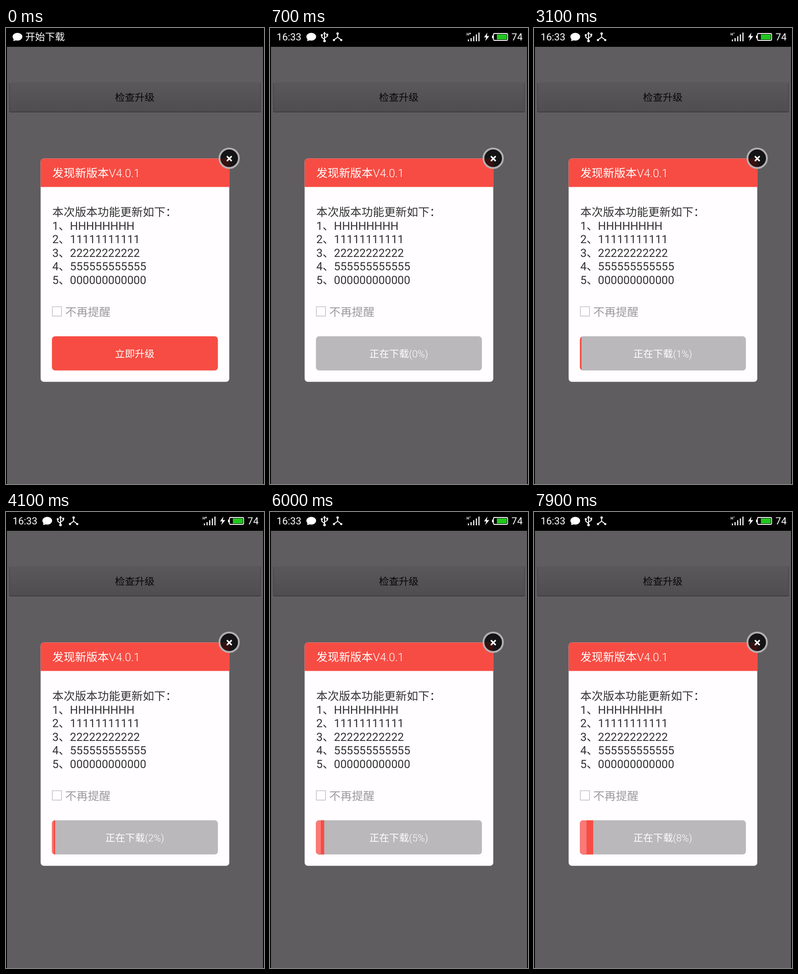
Write an HTML page that moves like this. It is 563 px wide and 994 px high and loops after 8 s.

```html
<!DOCTYPE html>
<html lang="zh-CN">
<head>
<meta charset="utf-8">
<title>升级对话框</title>
<style>
  html, body { margin: 0; width: 100%; height: 100%; overflow: hidden; background: #000; }
  svg { display: block; width: 100vw; height: 100vh; }
  text { font-family: Roboto, "Noto Sans CJK SC", "Noto Sans CJK", sans-serif; font-size: 24.7px; white-space: pre; text-rendering: geometricPrecision; }
  .small { font-size: 21.6px; }
  .light { font-weight: 300; }
  .mid { text-anchor: middle; }
  .white { fill: #fff; }
  .line { fill: none; stroke: #fff; stroke-width: 2; }
</style>
</head>
<body>
<svg viewBox="0 0 563 994" preserveAspectRatio="none">
  <defs>
    <linearGradient id="face" x2="0" y2="1">
      <stop offset="0" stop-color="#5a585a"/>
      <stop offset="1" stop-color="#4f4d4f"/>
    </linearGradient>
    <clipPath id="bar"><rect width="563" height="41"/></clipPath>
    <clipPath id="dialog"><rect x="75.6" y="284.4" width="411.6" height="486.8" rx="7"/></clipPath>
    <clipPath id="pill"><rect x="100.2" y="672" width="362.2" height="74.5" rx="7"/></clipPath>
    <g id="bubble" class="white">
      <ellipse cy="19" rx="10.7" ry="8.6"/>
      <path d="M-8 22 L-9 28.5 L0 26Z"/>
    </g>
  </defs>

  <rect width="563" height="994"/>
  <rect x="2" y="41" width="559" height="953" fill="#5f5d60"/>

  <g clip-path="url(#bar)">
    <g id="ticker">
      <use href="#bubble" x="25"/>
      <text class="small white" x="42" y="27">开始下载</text>
    </g>
    <g id="status">
      <text class="small white" x="14.5" y="27.3">16:33</text>
      <use href="#bubble" x="90"/>
      <g id="usb">
        <path class="line" d="M119 12V28M113 16V20L119 25M125 15V18L119 22"/>
        <path class="white" d="M119 8L122.5 13.5H115.5ZM123 12.5h4v4h-4Z"/>
        <circle class="white" cx="113" cy="15.5" r="2.3"/>
        <circle class="white" cx="119" cy="28.3" r="2.8"/>
      </g>
      <g id="hub">
        <path class="line" d="M147.5 12V20L139.5 26M147.5 20L155.5 26"/>
        <g class="white">
          <circle cx="147.5" cy="12" r="2.6"/>
          <circle cx="139.5" cy="26.3" r="2.4"/>
          <circle cx="155.5" cy="26.3" r="2.4"/>
        </g>
      </g>
      <path class="line" style="stroke-width:1.2" d="M430 10.5V16.5M433.5 10.5V16.5M430 13.5H433.5"/>
      <path class="white" d="M436 10h1.2v2.2h-1.2Z"/>
      <path id="plus" class="white" d="M435 11.5h3.2v1.2h-3.2ZM436 12h1.2v2h-1.2Z"/>
      <path class="line" style="stroke-width:2.4" d="M433 29V25M438.8 29V22M444.6 29V18M450.4 29V14M456 29V10"/>
      <path class="white" d="M474.5 10L467 20.5H472L469.5 28.5L478.5 17.5H473Z"/>
      <rect class="line" style="stroke-width:1.8" x="487.5" y="12" width="31" height="15" rx="2.5"/>
      <rect class="white" x="484.5" y="16.5" width="2.5" height="6"/>
      <rect x="495" y="14" width="21.5" height="11" fill="#1fc71c"/>
      <text class="small white" x="527" y="27.3">74</text>
    </g>
  </g>

  <rect x="7" y="119" width="549" height="65" rx="2" fill="#3f3d3f"/>
  <rect x="8" y="118" width="547" height="64" rx="2" fill="url(#face)"/>
  <text class="small mid" x="281" y="158.5" fill="#080808">检查升级</text>

  <g clip-path="url(#dialog)">
    <rect x="75" y="284" width="413" height="488" fill="#fffdff"/>
    <rect x="75" y="284" width="413" height="62.5" fill="#f74c43"/>
  </g>
  <text class="light white" x="101" y="324.8">发现新版本V4.0.1</text>
  <g id="notes" fill="#333233"></g>
  <rect x="101.2" y="607.5" width="20" height="20.5" fill="none" stroke="#c6c4c6" stroke-width="1.6"/>
  <text x="129.3" y="627.5" fill="#9c9a9c">不再提醒</text>

  <g clip-path="url(#pill)">
    <rect id="base" x="100" y="672" width="363" height="75"/>
    <rect id="done" x="100" y="672" height="75" fill="#f74c43"/>
    <rect id="pale" x="100" y="672" height="75" fill="#f97a77"/>
  </g>
  <text id="label" class="small light mid white" x="281" y="717.6"></text>

  <circle cx="487" cy="284" r="20" fill-opacity=".78"/>
  <circle cx="487" cy="284" r="21.2" fill="none" stroke="#b1afb1" stroke-width="4"/>
  <path class="line" style="stroke-width:3.2" d="M482 279.5L492.5 290M492.5 279.5L482 290"/>
</svg>
<script>
  const LOOP = 8000;
  const $ = id => document.getElementById(id);

  // [start ms, percent, percent covered by the paler part]
  const STEPS = [
    [700, 0, 0], [2600, 1, 0], [3600, 2, 1], [4500, 3, 1], [4700, 3, 2],
    [5100, 4, 2], [5500, 4, 3], [5800, 5, 3], [6700, 6, 3], [7000, 6, 0],
    [7200, 7, 0], [7600, 7, 2], [7800, 8, 4]
  ];

  const notes = ['本次版本功能更新如下：', '1、HHHHHHHH', '2、' + '1'.repeat(11),
    '3、' + '2'.repeat(11), '4、' + '5'.repeat(12), '5、' + '0'.repeat(12)];
  $('notes').innerHTML = notes.map((s, i) =>
    `<text x="101" y="${410.2 + 29.55 * i}">${s}</text>`).join('');

  function slide(el, y, opacity) {
    el.setAttribute('transform', `translate(0 ${y})`);
    el.setAttribute('opacity', opacity);
  }

  function draw(t) {
    const p = Math.min(1, Math.max(0, (t - 20) / 480));
    const ease = (1 - Math.cos(Math.PI * p)) / 2;
    slide($('ticker'), 41 * ease, 1 - ease);
    slide($('status'), 41 * (ease - 1), ease);
    // the data indicator alternates every second
    $('plus').setAttribute('opacity', Math.floor((t + 1900) / 1000) % 2 ? 1 : 0);
    if (t >= 100) $('plus').setAttribute('opacity', Math.floor((t - 100) / 1000) % 2 ? 0 : 1);

    const step = STEPS.filter(s => s[0] <= t).pop();
    const [, percent, pale] = step || [0, 0, 0];
    $('base').setAttribute('fill', step ? '#bab8ba' : '#f74c43');
    $('done').setAttribute('width', percent * 3.65);
    $('pale').setAttribute('width', pale * 3.65);
    const text = step ? `正在下载(${percent}%)` : '立即升级';
    if ($('label').textContent !== text) $('label').textContent = text;
  }

  function tick() {
    draw(performance.now() % LOOP);
    requestAnimationFrame(tick);
  }
  tick();
</script>
</body>
</html>
```
